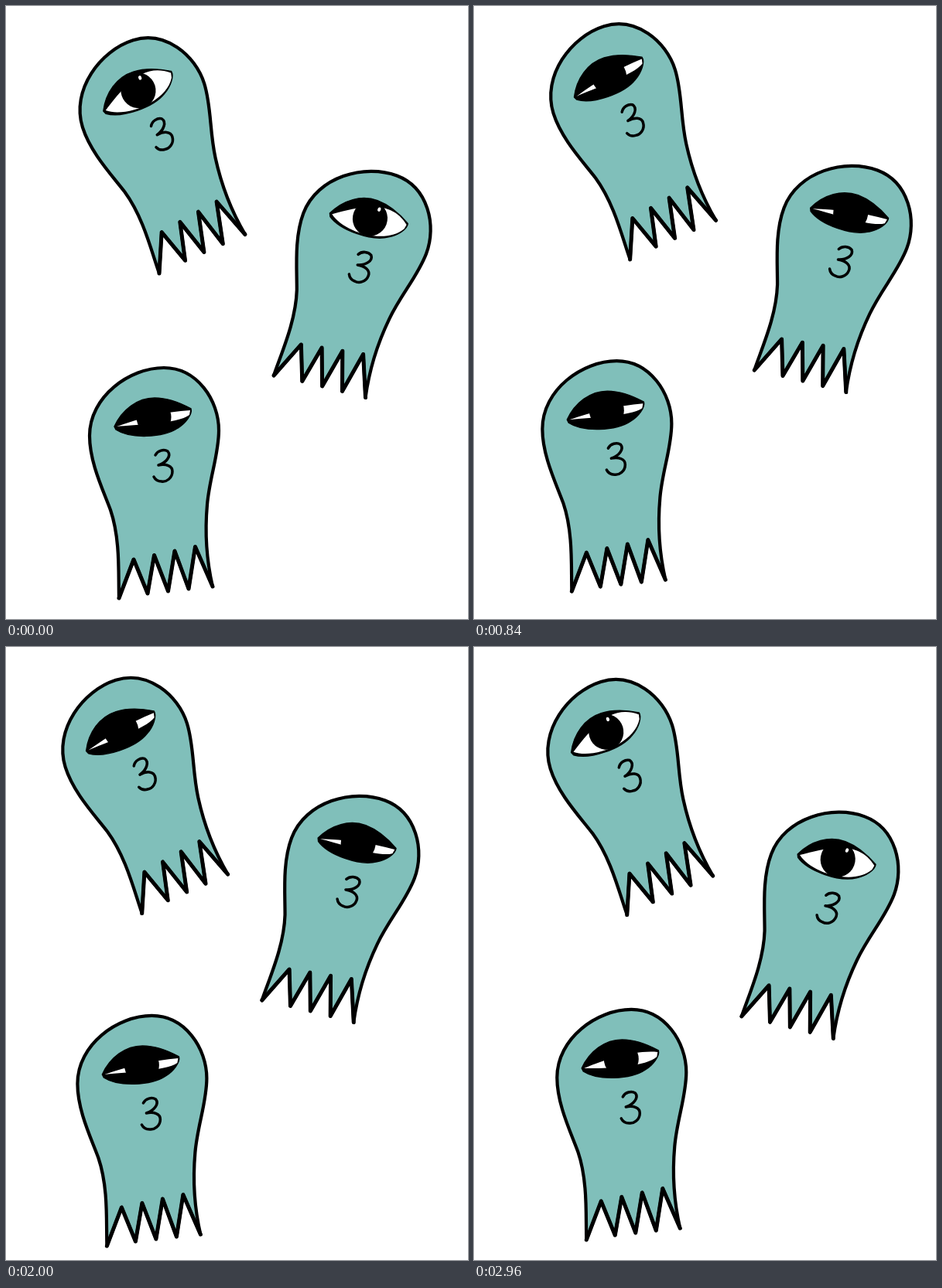
An HTML page with a canvas for the animation above (3000 ms loop, 597 by 793 pixels).

```html
<!DOCTYPE html>
<html lang="en">
<head>
<meta charset="utf-8">
<title>Ghosts</title>
<style>
  html, body { margin: 0; width: 100%; height: 100%; overflow: hidden; background: #fff; }
  canvas { display: block; width: 597px; height: 793px; }
</style>
</head>
<body>
<canvas id="stage" width="597" height="793"></canvas>
<script>
const ctx = document.getElementById('stage').getContext('2d');
const LOOP = 3000, STEP = 40, BLINK = 280;
const TEAL = '#80bfba', INK = '#000', WHITE = '#fff';

// One ghost, drawn upright; it turns about the tip of its first tooth
const TIP = { x: 146, y: 766 };
const SIDE = 'C145 735 148 690 135 652 C125 625 108 590 108 556 C108 505 160 468 204 468' +
  'C247 468 275 510 275 549 C275 580 263 610 260 645 C256 690 261 725 267 751';
const SOCKET = new Path2D('M140 544C150 522 170 507 192 507C212 507 228 515 239 521' +
  'C241 528 232 540 222 546C203 559 160 560 142 548Z');
const MOUTH = new Path2D('M193 581C196 575 204 573 209 576C214 582 207 591 197 594' +
  'C207 592 215 595 215 602C215 611 207 616 201 615C196 615 193 613 191 609');

// Zigzag hem, from right to left
let hem = '';
for (let i = 3; i >= 0; i--) {
  hem += `L${165 + 26.5 * i} ${716 - 5.5 * i}`;
  if (i) hem += `L${156.5 + 26.5 * i} ${763 - 3 * i}`;
}
hem += `L${TIP.x} ${TIP.y}`;
const body = new Path2D(`M${TIP.x} ${TIP.y}${SIDE}${hem}Z`);
const teeth = new Path2D(`M267 751${hem}`);

// x and y: cosine and sine weights of the drift's first and second harmonic
// open and shut: when the lids start to move
const ghosts = [
  { home: [198, 346], turn: -17.4, open: 2460, shut: 140,
    x: [9.9, 9.5, -2.5, -3.4], y: [5.5, -9.1, 1.2, 0.8] },
  { home: [346, 478], turn: 20.6, open: 2620, shut: 460,
    x: [-1.4, 13.8, 0.5, -5.4], y: [9.2, 4.9, 0.8, -2] },
  { home: [146, 766], turn: 0, open: 2060, shut: 2730,
    x: [14.7, -1.6, -0.6, 4.8], y: [-0.7, -9.9, 0.1, -0.6] }
];

// Starts each loop at zero
function drift([c1, s1, c2, s2], t) {
  const a = 2 * Math.PI * t / LOOP;
  return c1 * (Math.cos(a) - 1) + s1 * Math.sin(a)
    + c2 * (Math.cos(2 * a) - 1) + s2 * Math.sin(2 * a);
}

function openness(g, t) {
  const since = s => (t - s + LOOP) % LOOP;
  const a = since(g.open), b = since(g.shut);
  return a < b ? Math.min(1, a / BLINK) : Math.max(0, 1 - b / BLINK);
}

function disc(x, y, rx, ry, color) {
  ctx.fillStyle = color;
  ctx.beginPath();
  ctx.ellipse(x, y, rx, ry, 0, 0, 2 * Math.PI);
  ctx.fill();
}

function line(path, width) {
  ctx.lineWidth = width;
  ctx.stroke(path);
}

function drawEye(open) {
  const mix = (shut, wide) => shut + (wide - shut) * open;
  ctx.fillStyle = INK;
  ctx.fill(SOCKET);
  line(SOCKET, 1.5);
  ctx.fillStyle = WHITE;
  ctx.beginPath();
  ctx.moveTo(143, 544);
  ctx.bezierCurveTo(172, mix(534, 524), 206, mix(525.5, 498), 238, 523);
  ctx.lineTo(237, 529);
  ctx.bezierCurveTo(222, mix(540, 557), 165, mix(541, 561), 143, 544);
  ctx.fill();
  disc(191, 532, 22.5, 23, INK);
  if (open > 0.75) disc(198, 517, 2, 2.8, WHITE);
}

function drawGhost(g, t) {
  ctx.save();
  ctx.translate(g.home[0] + drift(g.x, t), g.home[1] + drift(g.y, t));
  ctx.rotate(g.turn * Math.PI / 180);
  ctx.translate(-TIP.x, -TIP.y);
  ctx.lineJoin = ctx.lineCap = 'round';
  ctx.strokeStyle = INK;
  ctx.fillStyle = TEAL;
  ctx.fill(body);
  line(body, 4.2);
  line(teeth, 5);
  line(MOUTH, 3.5);
  drawEye(openness(g, t));
  ctx.restore();
}

const start = performance.now();
function draw() {
  const t = Math.floor((performance.now() - start) % LOOP / STEP) * STEP;
  ctx.fillStyle = WHITE;
  ctx.fillRect(0, 0, 597, 793);
  ghosts.forEach(g => drawGhost(g, t));
  requestAnimationFrame(draw);
}
draw();
</script>
</body>
</html>
```
